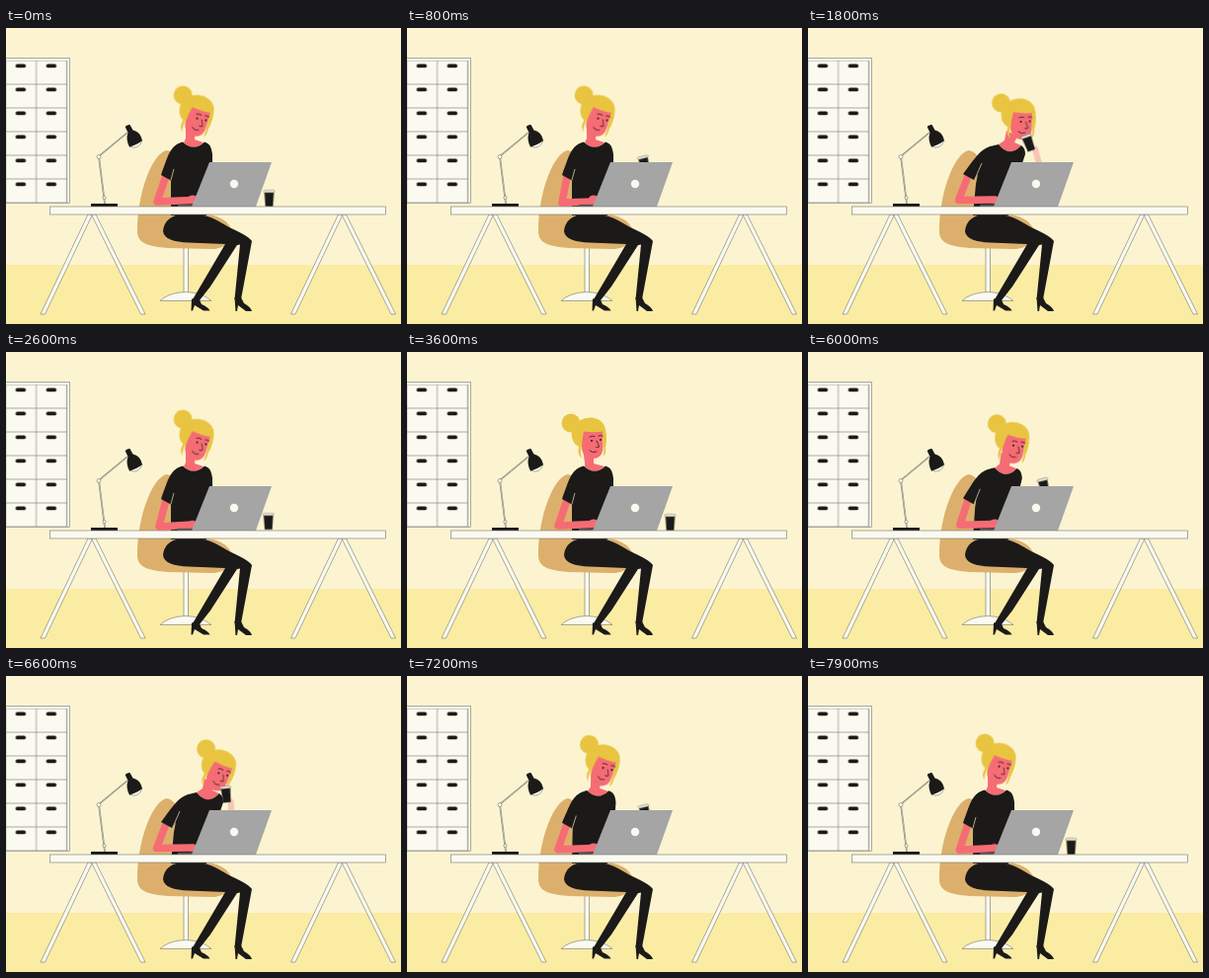
An HTML page that plays this animation: 400 by 300 pixels, repeating every 8 s.

```html
<!DOCTYPE html>
<html lang="en">
<head>
<meta charset="utf-8">
<title>Coffee at the desk</title>
<style>
  html, body { margin: 0; width: 100%; height: 100%; overflow: hidden; background: #fcf4d0; }
  svg { display: block; width: 100vw; height: 100vh; }
  .paper { fill: #fafaf0; stroke: #75746b; stroke-width: .6; }
  .ink { fill: #1b1a19; }
  .skin { fill: #f66c74; }
  .hair { fill: #e8c441; }
  .line { fill: none; stroke: #2a1c1c; stroke-width: .8; stroke-linecap: round; }
  .limb { fill: none; stroke: #f66c74; stroke-linejoin: round; stroke-linecap: round; }
  .move { animation: 8s ease-in-out infinite; }

  #head { animation-name: head; }
  @keyframes head {
    0%, 12%, 32%, 36%, 53%, 70%, 92%, 100% { transform: translate(192px, 96.4px) rotate(18deg); }
    17.5%, 24% { transform: translate(215.3px, 100px) rotate(3deg); }
    40%, 48% { transform: translate(187px, 95px) rotate(0deg); }
    78% { transform: translate(213px, 101px) rotate(10deg); }
    81.5%, 86% { transform: translate(213.5px, 103px) rotate(22deg); }
  }

  #neck { animation-name: neck; }
  @keyframes neck {
    0%, 12%, 32%, 36%, 53%, 70%, 92%, 100% { d: path("M182 98L192 104L191 113L200 116Q190 126 180 116L182 112Z"); }
    17.5%, 24%, 78%, 86% { d: path("M201 104L212 110L209 116L216 119Q204 132 193 118L199 114Z"); }
    40%, 48% { d: path("M178 98L189 104L189 113L200 116Q190 126 180 116L180 112Z"); }
  }

  #shirt { animation-name: shirt; }
  @keyframes shirt {
    0%, 12%, 32%, 70%, 92%, 100% { d: path("M179 115.5Q190 126 201 115.5C206 117 208 120 209 128L209 137L204 152L203 190L167 190L167 158L168 125C170 119 174 117 179 115.5Z"); }
    17.5%, 24%, 78%, 86% { d: path("M193 118Q204 132 216 119C219 121 220 124 220 128L217 137L206 152L203 190L167 190L170 158L176 128C180 121 187 119 193 118Z"); }
  }

  #sleeve { animation-name: sleeve; }
  @keyframes sleeve {
    0%, 12%, 32%, 70%, 92%, 100% { d: path("M176 117C166 120 164 130 157 149L167 154.5L173 138Z"); }
    17.5%, 24%, 78%, 86% { d: path("M186 119.5C174 123 170 131 157 148L168 154L179 138Z"); }
  }

  #fold { animation-name: fold; }
  @keyframes fold {
    0%, 12%, 32%, 70%, 92%, 100% { d: path("M170 143L167 154"); }
    17.5%, 24%, 78%, 86% { d: path("M176 137L169 153"); }
  }

  #arm { animation-name: arm; }
  @keyframes arm {
    0%, 40%, 48%, 92%, 100% { d: path("M162 150L153 176L189 174.5"); }
    4%, 34%, 53%, 59%, 96% { d: path("M162 150L155 177L189 175"); }
    10%, 37%, 56%, 64%, 70% { d: path("M162 150L157 177L188 176"); }
    17.5%, 24%, 78%, 86% { d: path("M162 150L152.5 174.5L189 174"); }
  }

  #hand { animation: tap .4s ease-in-out infinite; }
  @keyframes tap { 50% { transform: translateY(1.5px); } }

  #cup { animation-name: sip; }
  @keyframes sip {
    0%, 6%, 33%, 70%, 94%, 100% { transform: translate(266.5px, 172.7px) rotate(0deg); }
    10%, 29%, 74%, 89.5% { transform: translate(240.5px, 138px) rotate(-14deg); }
    16%, 24% { transform: translate(223.5px, 116.5px) rotate(-20deg); }
    79%, 85.5% { transform: translate(223px, 120px) rotate(-6deg); }
  }

  #grip { animation: grip 8s step-end infinite; }
  @keyframes grip {
    0%, 30%, 91% { opacity: 0; }
    9%, 73% { opacity: 1; }
  }
</style>
</head>
<body>
<svg viewBox="0 0 400 300" preserveAspectRatio="none">
  <defs>
    <pattern id="drawer" x="30.6" y="33" width="31" height="24" patternUnits="userSpaceOnUse">
      <rect class="paper" width="31" height="24"/>
      <rect class="ink" x="10.2" y="3.6" width="10.2" height="3.6" rx="1.5"/>
    </pattern>
    <clipPath id="aboveDesk"><rect width="400" height="181"/></clipPath>
    <g id="trestle" class="paper">
      <path d="M-4 189H.5L-47.5 290H-52Z"/>
      <path d="M-.5 189H4L54 290H49.5Z"/>
    </g>
  </defs>

  <rect width="400" height="300" fill="#fcf4d0"/>
  <rect y="240" width="400" height="60" fill="#fbeca4"/>

  <!-- cabinet -->
  <rect class="paper" x="-2" y="30.5" width="66.5" height="147"/>
  <rect x="-2" y="33" width="63.8" height="144" fill="url(#drawer)"/>
  <path class="paper" d="M61.8 33V177"/>

  <!-- lamp -->
  <path d="M100 178L94 130L123 106" fill="none" stroke="#75746b" stroke-width="1.6"/>
  <path d="M100 178L94 130L123 106" fill="none" stroke="#fafaf0" stroke-width=".5"/>
  <circle class="paper" cx="94" cy="130.5" r="2"/>
  <circle class="paper" cx="99.5" cy="172" r="1.6"/>
  <rect class="ink" x="86" y="178" width="27" height="3"/>
  <path class="paper" d="M125 120Q134 124 138 114Z"/>
  <path class="ink" d="M120.8 100.5Q121 98.5 125.5 98L128.5 103.5Q136 105 138 114Q133 118 125 120.5Q121 113 123.5 106Z"/>

  <!-- chair -->
  <rect class="paper" x="180" y="220" width="4.5" height="50"/>
  <path class="paper" d="M156 276.5Q165 268 182 267.5Q198 268 208 276.5Z"/>
  <path fill="#dcb06c" d="M163 124C149 126 133 165 133 206C133 218 143 221 163 223L208 224C224 224 230 214 229 206C226 195 214 189 200 189L184 160Q176 126 163 124Z"/>

  <!-- legs -->
  <g class="ink">
    <path d="M159 206C160 195 168 189 180 189H194C208 190 217 197 226 202C236 207 246 211 249 216L238 275H231.5L237 219.5L234 220L207 262L196 276H188.5L222 219L185 217.5C170 217 160 214 159 206Z"/>
    <path d="M231.5 273H238L241 279Q248 283 249 287H243L235 281L234 287H232.5Z"/>
    <path d="M188 274.5H195.5L198 280Q205 283 206.5 286.5H200L191 281L189 286.5H187.5Z"/>
  </g>

  <!-- upper body -->
  <path id="neck" class="skin move"/>
  <path id="shirt" class="ink move"/>
  <g id="head" class="move">
    <path class="skin" d="M-10 -16H11.5V0C12 8 8 13 2 13C-5 13 -10 8 -10 2Z"/>
    <circle class="hair" cx="-21" cy="-23" r="9.4"/>
    <path class="hair" d="M-13 1C-21 -3 -22 -14 -18 -19C-11 -31 6 -31 12 -22C15 -17 16 -6 14 2Q15 7 12 11Q13 3 11.5 -4L11 -14.5Q2 -13 -8 -14.5Q-10 -6 -10 0Q-12 6 -10 13Q-15 8 -13 1Z"/>
    <path class="line" d="M-2 -9Q0 -10.5 3 -9.5M7 -10Q9 -11 11 -10M5 -5Q7 -1 7.5 1Q6 2.5 4.5 1.5M-2 5Q1 8 5 6"/>
    <circle class="ink" cx="0" cy="-5" r="1"/>
    <circle class="ink" cx="9" cy="-6" r="1"/>
  </g>

  <!-- cup -->
  <g clip-path="url(#aboveDesk)">
    <g id="cup" class="move">
      <g id="grip">
        <path d="M4 8L2 32" fill="none" stroke="#f9c4b4" stroke-width="6" stroke-linecap="round"/>
      </g>
      <path class="ink" d="M-4.8 -6H4.8L3.8 8.3H-3.8Z"/>
      <rect class="paper" x="-5.3" y="-8.2" width="10.6" height="2.2" rx=".6"/>
    </g>
  </g>

  <!-- typing arm -->
  <path id="arm" class="limb move" stroke-width="7.5"/>
  <ellipse id="hand" class="skin" cx="189" cy="173" rx="5" ry="3.6"/>
  <path id="sleeve" class="ink move"/>
  <path id="fold" class="move" fill="none" stroke="#d8c8a8" stroke-width=".8"/>

  <!-- laptop -->
  <rect x="174" y="178.8" width="20" height="2.2" fill="#5b5756"/>
  <path fill="#a5a5a5" d="M206 136H269L253 181H188Z"/>
  <circle cx="231" cy="158" r="4.2" fill="#faf8f0"/>

  <!-- desk -->
  <use href="#trestle" x="87"/>
  <use href="#trestle" x="340.5"/>
  <rect class="paper" x="44.5" y="181" width="340" height="8"/>
</svg>
</body>
</html>
```
